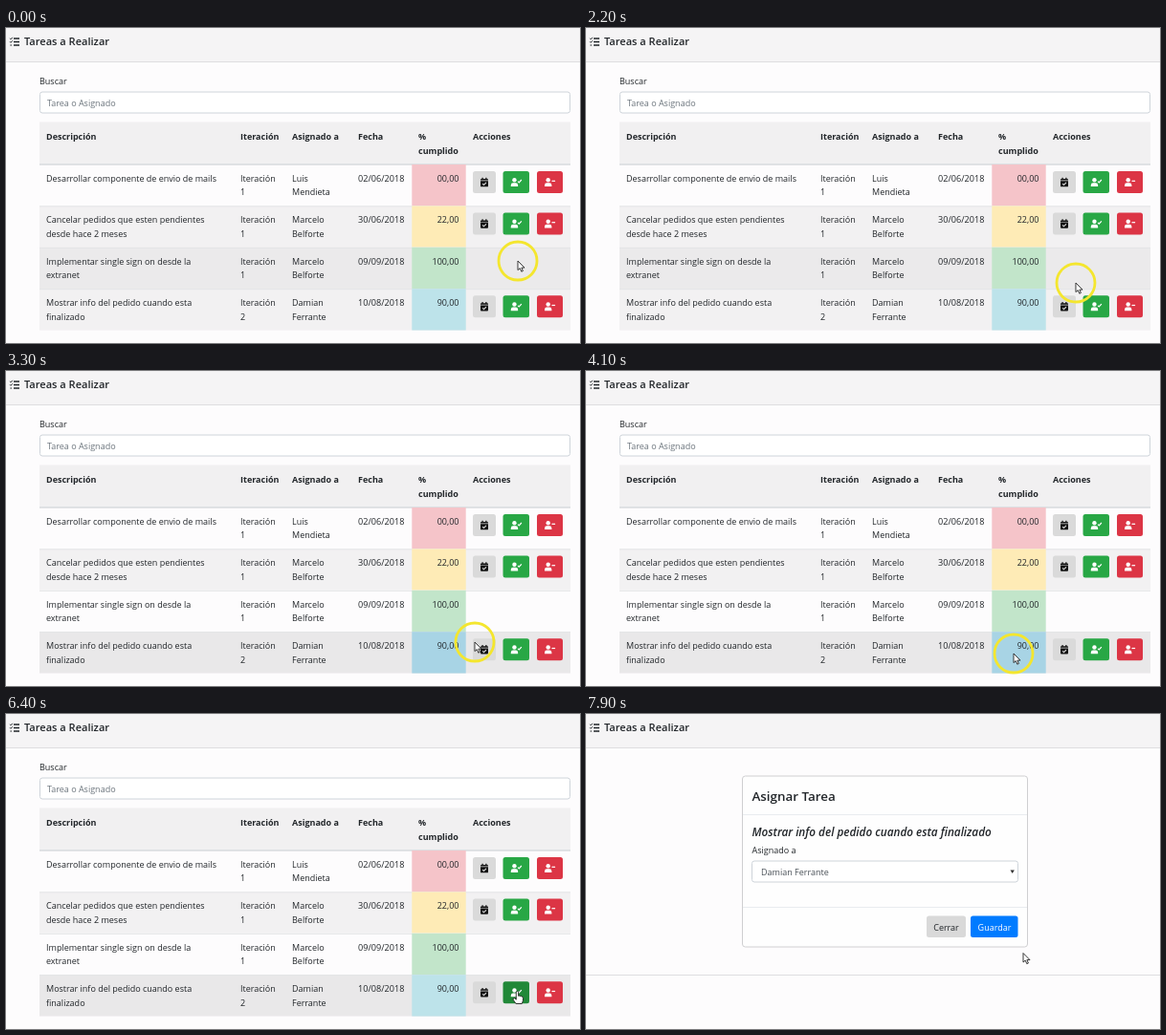
Animation of 600 by 330 pixels, one loop 8000 ms. Source, as an HTML page:

```html
<!DOCTYPE html>
<html lang="es">
<head>
<meta charset="utf-8">
<title>Tareas a Realizar</title>
<style>
html, body { margin: 0; width: 600px; height: 330px; overflow: hidden; background: #fdfcfd; }
svg { display: block; font: 9px "Open Sans", "Noto Sans", sans-serif; fill: #212529; }
</style>
</head>
<body>
<svg id="stage" width="600" height="330" viewBox="0 0 600 330"></svg>
<script>
const text = (x, y, s, attrs = '') => `<text x="${x}" y="${y}" ${attrs}>${s}</text>`;
const rect = (x, y, w, h, fill, attrs = '') =>
  `<rect x="${x}" y="${y}" width="${w}" height="${h}" fill="${fill}" ${attrs}/>`;
const rule = (y, x = 0, w = 600, color = '#dedee0') => rect(x, y, w, 1, color);
const lines = (x, y, s, attrs) =>
  s.split('|').map((part, i) => text(x, y + i * 14.3, part, attrs)).join('');
const group = (id, content, attrs = '') => `<g id="${id}" ${attrs}>${content}</g>`;

const ROW_TOP = 143, ROW_H = 43.4;
const rows = [
  ['Desarrollar componente de envio de mails', 1, 'Luis|Mendieta', '02/06/2018', '00,00', '#f5c4c9'],
  ['Cancelar pedidos que esten pendientes|desde hace 2 meses', 1, 'Marcelo|Belforte', '30/06/2018', '22,00', '#feebb6'],
  ['Implementar single sign on desde la|extranet', 1, 'Marcelo|Belforte', '09/09/2018', '100,00', '#c2e5ca'],
  ['Mostrar info del pedido cuando esta|finalizado', 2, 'Damian|Ferrante', '10/08/2018', '90,00', '#bde3ea']
];

const calendar = `<path d="M-4-1.3h8v5.2q0 .9-.9.9h-6.2q-.9 0-.9-.9zM-4-1.9v-.7q0-.9.9-.9h.6v-1.2h1.2v1.2h2.6v-1.2h1.2v1.2h.6q.9 0 .9.9v.7z" fill="#111"/>
  <path d="M-1.8 1.6l1.3 1.3 2.5-2.5" fill="none" stroke="#dadada" stroke-width="1.1"/>`;
const user = mark => `<g fill="#fff"><circle cx="-1.8" cy="-2.2" r="2.2"/>
  <path d="M-5.5 4.5v-1.3q0-2.4 2.4-2.4h2.6q2.4 0 2.4 2.4v1.3z"/></g>
  <path d="${mark}" fill="none" stroke="#fff" stroke-width="1.2"/>`;
const button = (x, y, w, fill, icon, id = '') =>
  rect(x, y, w, 23, fill, `rx="2.5" id="${id}"`) +
  `<g transform="translate(${x + w / 2} ${y + 11.5})">${icon}</g>`;

function tableRow([task, iteration, person, date, done, color], i) {
  const top = ROW_TOP + i * ROW_H, base = top + 18;
  const actions = i === 2 ? '' :
    button(488, top + 7, 24, '#dadada', calendar) +
    button(519.5, top + 7, 27.5, '#28a745', user('M1.8-.9l1.2 1.2 2.6-2.8'), 'assign' + i) +
    button(555, top + 7, 27, '#dc3545', user('M2-1.2h3.6'));
  return rect(35, top, 555, ROW_H, i % 2 ? '#f2f1f2' : '#fdfcfd', `id="row${i}"`) +
    rule(top, 35, 555, '#e3e4e6') +
    rect(424.3, top, 56.4, ROW_H, color, `id="cell${i}"`) +
    lines(42, base, task) + lines(245, base, 'Iteración|' + iteration) + lines(299, base, person) +
    text(368, base, date, 'font-size="9.15"') +
    text(473.5, base, done, 'text-anchor="end"') + actions;
}

const header = rect(0, 0, 600, 35, '#f5f4f5') + rule(35) +
  text(19, 18.3, 'Tareas a Realizar', 'font-size="11.05" font-weight="600"') +
  `<path d="M8 11h6M8 14.5h6M8 18h6" stroke="#212529" stroke-width="1.4"/>
   <path d="M4 10.8l1 1 1.8-2M4 14.3l1 1 1.8-2M4.4 18h1.6" fill="none" stroke="#212529"/>`;

const heads = [[42, 'Descripción'], [245, 'Iteración'], [299, 'Asignado a'], [368, 'Fecha'],
  [431, '%|cumplido'], [488, 'Acciones']];
const list = text(35, 58.5, 'Buscar') +
  rect(35.5, 67, 554, 22, '#fff', 'rx="2.5" stroke="#ced4da"') +
  text(43, 82, 'Tarea o Asignado', 'fill="#6c757d"') +
  rect(35, 98.5, 555, 44.5, '#f1f0f1') + rule(142, 35, 555, '#dcdfe2') +
  heads.map(([x, s]) => lines(x, 117.3, s, 'font-weight="700"')).join('') +
  rows.map(tableRow).join('');

const modal = rule(273) +
  rect(163.5, 65, 298, 179, '#fefefe', 'rx="3" stroke="#cfcfd1"') +
  text(173.5, 91, 'Asignar Tarea', 'font-size="13.4" font-weight="600"') +
  rule(105, 164, 297, '#e9ecef') +
  text(173.5, 127.5, 'Mostrar info del pedido cuando esta finalizado',
    'font-size="11.75" font-weight="600" font-style="italic"') +
  text(173.5, 145.5, 'Asignado a') +
  rect(173.5, 154, 278, 22, '#fff', 'rx="2.5" stroke="#ced4da"') +
  text(183, 168.8, 'Damian Ferrante', 'fill="#495057"') +
  '<path d="M443.5 163.5h4.4l-2.2 3.6z" fill="#333"/>' +
  rule(202, 164, 297, '#e9ecef') +
  rect(356, 211.5, 41, 22.5, '#d9d9d9', 'rx="2.5"') +
  text(376.5, 226.5, 'Cerrar', 'text-anchor="middle"') +
  rect(402, 211.5, 49.5, 22.5, '#007bff', 'rx="2.5"') +
  text(427, 226.5, 'Guardar', 'text-anchor="middle" fill="#fff"');

const tooltip = (id, x, y, w, s) => group(id,
  rect(x + 2, y + 2, w, 12, '#000', 'opacity=".25"') +
  rect(x + .5, y + .5, w, 12, '#fff', 'stroke="#8a8a8a" stroke-width=".8"') +
  text(x + 3.5, y + 9, s, 'font-size="6.95" fill="#444"'));

const pointer = '<circle id="halo" r="20" fill="none" stroke="#f4e62e" stroke-width="2.8"/>' +
  group('arrow', '<path d="M0 0V9.6L2.2 7.6 3.8 11.2 5.4 10.5 3.9 7.1H7z"/>') +
  group('hand', `<path d="M-1.2-.8Q0-2.4 1.2-.8V3.4Q2.2 2.7 3 3.7 4 3.1 4.6 4.1 6 3.8 6 5.3V8.2
    L4.8 11.5H-1.4L-4.4 7.2Q-4.6 5.4-2.8 5.8L-1.2 7.2z"/>`);

const stage = document.getElementById('stage');
stage.innerHTML = rect(0, 0, 600, 330, '#fdfcfd') + header + group('list', list) + group('modal', modal) +
  tooltip('tipDone', 499.5, 305, 87.5, 'Marcarla como cumplida') +
  tooltip('tipAssign', 535, 307.5, 76, 'Asignar una persona') +
  '<circle id="click" cx="537" cy="291" r="4.5" fill="#1667e0" opacity=".75"/>' +
  group('pointer', pointer, 'fill="#fff" stroke="#222" stroke-width=".9" stroke-linejoin="round"');

const $ = id => document.getElementById(id);
const show = (id, on) => $(id).style.display = on ? '' : 'none';
const between = (t, a, b) => t >= a && t < b;

// time, x, y
const path = [[0, 535, 244], [900, 530, 251], [2200, 512, 267], [3300, 490, 284], [3900, 449, 296],
  [4100, 447, 296], [4600, 491, 291], [5000, 501, 292], [5900, 502, 292], [6500, 537, 292],
  [7500, 537, 292], [7900, 457, 250.5], [8000, 457, 250.5]];

function position(t) {
  const i = path.findIndex(p => p[0] > t);
  const [t0, x0, y0] = path[i - 1], [t1, x1, y1] = path[i];
  const u = (t - t0) / (t1 - t0);
  const k = t < 3300 ? u : u * u * (3 - 2 * u);
  return [x0 + (x1 - x0) * k, y0 + (y1 - y0) * k];
}

function draw(t) {
  const [x, y] = position(t);
  const open = t >= 7600;
  const lastRow = y > ROW_TOP + 3 * ROW_H;
  const onButton = !open && y > 285 && (between(x, 492, 512) || between(x, 520, 547));

  show('list', !open);
  show('modal', open);
  $('row2').setAttribute('fill', lastRow ? '#fdfcfd' : '#ebeaeb');
  $('row3').setAttribute('fill', lastRow ? '#e9e8e9' : '#f2f1f2');
  $('cell3').setAttribute('fill', lastRow && x < 491 ? '#a8d4e5' : '#bde3ea');
  $('assign3').setAttribute('fill', onButton && x > 519 ? '#218838' : '#28a745');

  show('tipDone', between(t, 5200, 6000));
  show('tipAssign', between(t, 7000, 7600));
  show('click', between(t, 7300, 7600));
  show('arrow', !onButton);
  show('hand', onButton);
  $('pointer').setAttribute('transform', `translate(${x} ${y})`);
  $('halo').setAttribute('opacity', Math.max(0, Math.min(1, 1 - (t - 4600) / 970)));
}

const start = performance.now();
function tick() {
  draw((performance.now() - start) % 8000);
  requestAnimationFrame(tick);
}
tick();
</script>
</body>
</html>
```
